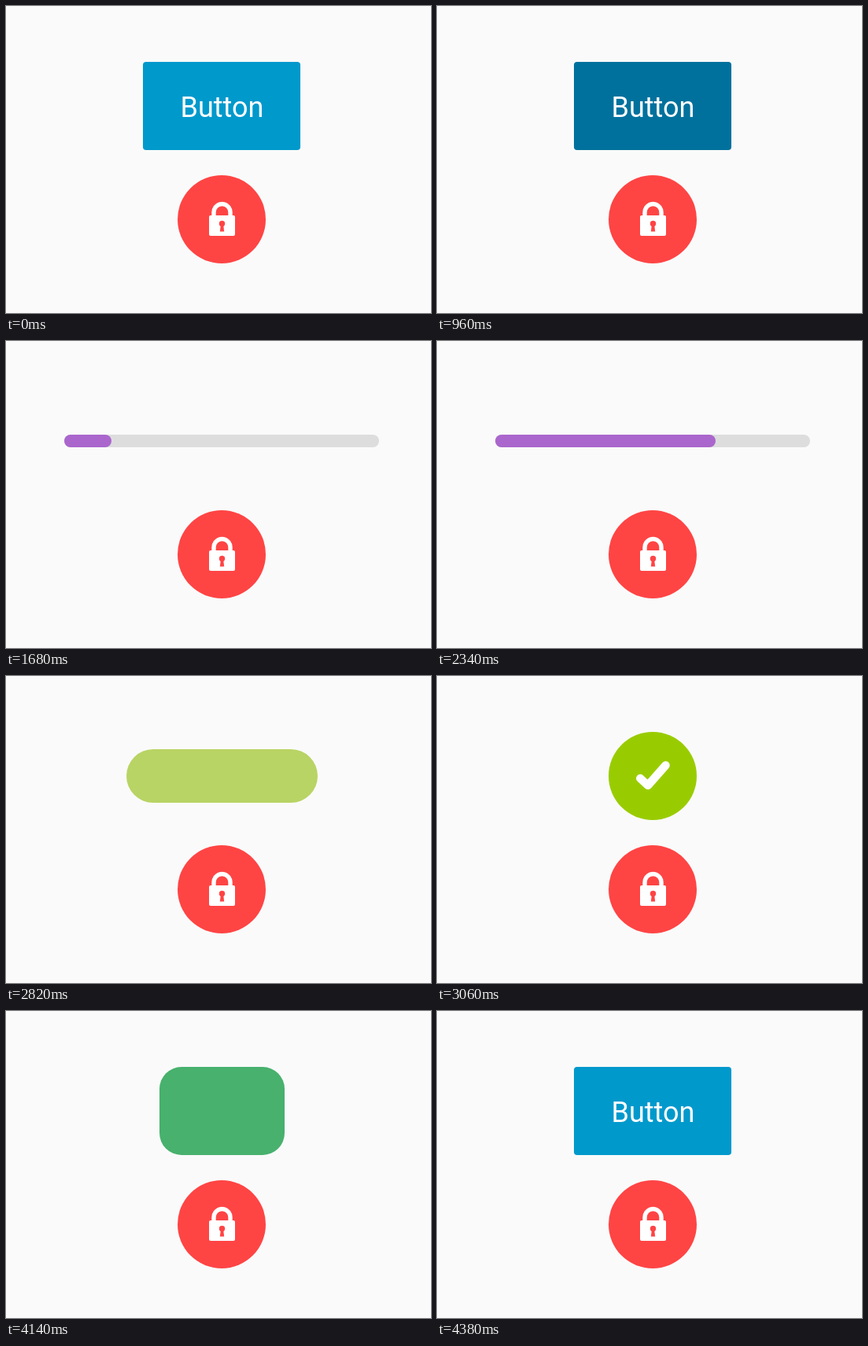
An HTML page that plays this animation: 540 px wide and 390 px high, repeating every 5580 ms.

```html
<!DOCTYPE html>
<html lang="en">
<head>
<meta charset="utf-8">
<title>Morphing button</title>
<style>
  html, body { margin: 0; width: 100%; height: 100%; overflow: hidden; background: #fafafa; }
  svg { display: block; width: 540px; height: 390px; }
  text { font: 400 36px Roboto, sans-serif; fill: #fff; text-anchor: middle; }
  .line { fill: none; stroke: #fff; }
</style>
</head>
<body>
<svg viewBox="0 0 540 390">
  <rect id="shape"/>
  <rect id="fill" x="74" y="119" height="16" rx="8" fill="#aa66cc"/>
  <text id="label" x="274.5" y="141">Button</text>
  <path id="check" class="line" d="M258.25 130L268 139L290.5 113.5" stroke-width="10.5" stroke-linecap="round" stroke-linejoin="round"/>
  <circle cx="274" cy="271" r="56" fill="#ff4444"/>
  <path class="line" d="M264 268V262A10.5 10.5 0 0 1 285 262V268" stroke-width="5.4"/>
  <rect x="258" y="266" width="33" height="26" rx="2" fill="#fff"/>
  <path d="M272.9 278L271.8 286.5H277.2L276.1 278Z" fill="#ff4444"/>
  <circle cx="274.5" cy="276.4" r="3.7" fill="#ff4444"/>
</svg>
<script>
const LOOP = 5580, TICK = 60;
const el = id => document.getElementById(id);
const shape = el('shape'), fill = el('fill'), label = el('label'), check = el('check');

// width, height, corner radius, red, green, blue
const button = [200, 112, 4, 0, 153, 204];
const bar = [400, 16, 8, 221, 221, 221];
const done = [112, 112, 56, 153, 204, 0];

const morphs = [
  { start: 1140, time: 480, from: button, to: bar },
  { start: 2576, time: 461, from: bar, to: done },
  { start: 3890, time: 480, from: done, to: button }
];

// time, percent loaded
const progress = [[1680, 15], [2280, 60], [2340, 70], [2576, 100]];

const mix = (a, b, p) => a + (b - a) * p;
const ease = p => (1 - Math.cos(Math.PI * p)) / 2;
const within = (t, a, b) => t >= a && t < b;
const show = (node, on) => node.setAttribute('visibility', on ? 'visible' : 'hidden');

function set(node, attrs) {
  for (const name in attrs) node.setAttribute(name, attrs[name]);
}

function shapeAt(t) {
  let state = button;
  for (const { start, time, from, to } of morphs) {
    if (t < start) break;
    const p = ease(Math.min(1, (t - start) / time));
    state = from.map((v, i) => mix(v, to[i], p));
  }
  return state;
}

function loadedAt(t) {
  for (let i = 1; i < progress.length; i++) {
    const [t0, v0] = progress[i - 1], [t1, v1] = progress[i];
    if (within(t, t0, t1)) return mix(v0, v1, (t - t0) / (t1 - t0));
  }
  return 0;
}

function draw(t) {
  const [w, h, r, ...rgb] = shapeAt(t).map(Math.round);
  let color = `rgb(${rgb})`;
  if (within(t, 960, 1140)) color = '#00719d';
  if (within(t, 3720, 3900)) color = '#6f9c00';
  set(shape, {
    x: 274 - Math.floor(w / 2), y: 127 - Math.floor(h / 2),
    width: w, height: h, rx: r, fill: color
  });

  const loaded = loadedAt(t);
  fill.setAttribute('width', loaded * 4);
  show(fill, loaded > 0);
  show(label, t < 1140 || t >= 4370);
  show(check, within(t, 3037, 3900));
}

const begin = performance.now();
function frame() {
  const t = (performance.now() - begin + 1) % LOOP;
  draw(Math.floor(t / TICK) * TICK);
  requestAnimationFrame(frame);
}
frame();
</script>
</body>
</html>
```
